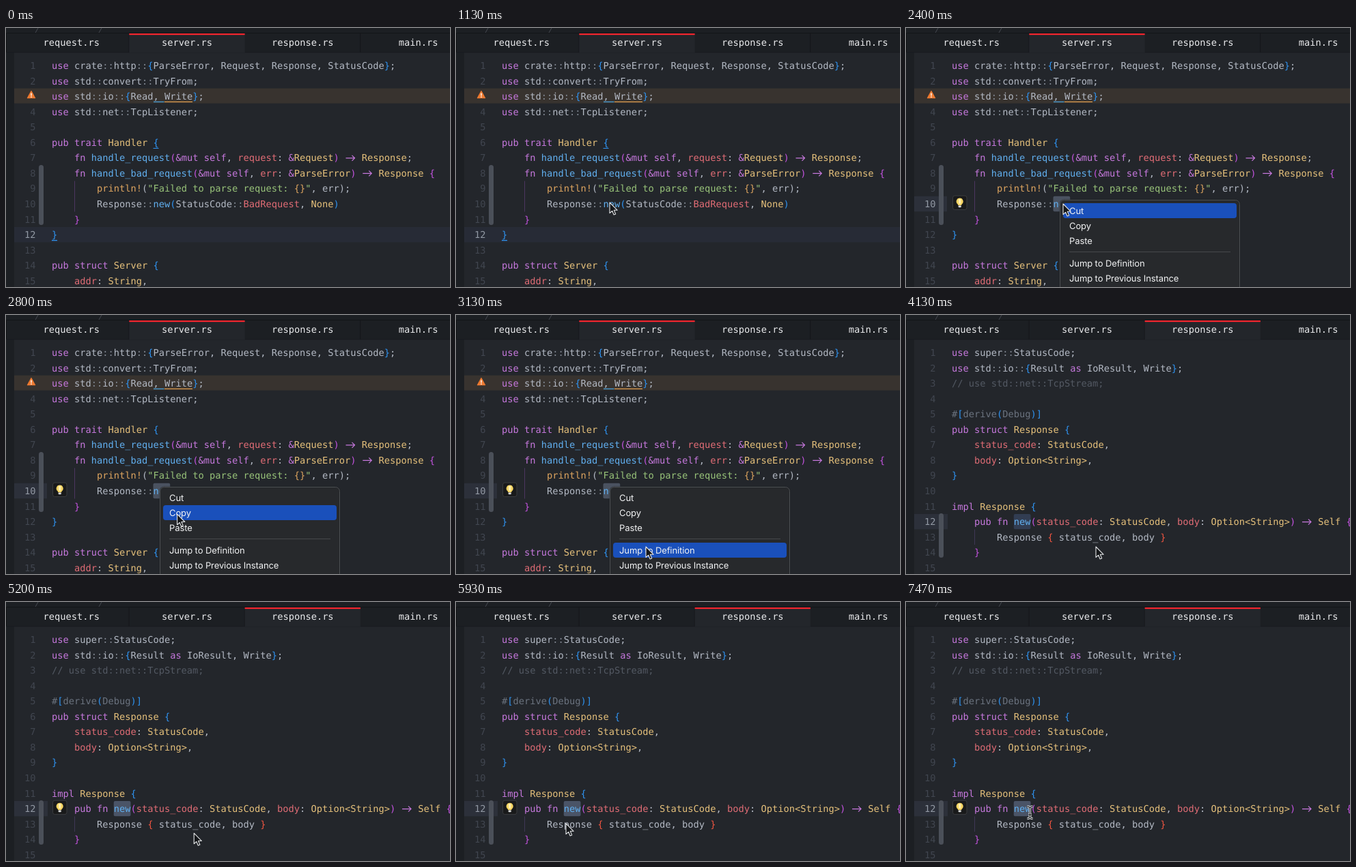
Animation of 650 by 380 pixels, one loop 7530 ms. Source, as an HTML page:

```html
<!DOCTYPE html>
<html lang="en">
<head>
<meta charset="utf-8">
<title>Jump to Definition</title>
<style>
html, body { margin: 0; width: 100%; height: 100%; overflow: hidden; background: #23262b; }
svg { display: block; width: 650px; height: 380px; text-rendering: geometricPrecision; }
text { white-space: pre; }
.code text { font: 13.7px "DejaVu Sans Mono", "Noto Sans Mono", monospace; }
.ui { font: 13px Inter, "Open Sans", sans-serif; letter-spacing: -.1px; fill: #f2f3f4; }
.tab { font: 500 11px Inter, "Open Sans", sans-serif; fill: #e9eaec; text-anchor: middle; }
</style>
</head>
<body>
<svg id="stage" viewBox="0 0 650 380"></svg>
<script>
const NS = 'http://www.w3.org/2000/svg';
const stage = document.getElementById('stage');
const CELL = 8.25, LEFT = 67, PITCH = 22.55;
const LOOP = 7530, RATE = 0.015; // 15 ticks per second

const COLORS = {
  t: '#b3b9c4', p: '#c678dd', y: '#e5c07b', r: '#e06c75', b: '#61afef', g: '#98c379',
  o: '#dda45f', d: '#828993', c: '#535963', a: '#2f94f2', m: '#c453e0', e: '#ef5541', n: '#6b737f'
};

// "~x" switches the colour of the text that follows
const SERVER = [
  '~puse ~tcrate~d::~thttp~d::~a{~tParseError, Request, Response, StatusCode~a}~t;',
  '~puse ~tstd~d::~tconvert~d::~tTryFrom;',
  '~puse ~tstd~d::~tio~d::~a{~tRead, Write~a}~t;',
  '~puse ~tstd~d::~tnet~d::~tTcpListener;',
  '',
  '~ppub trait ~yHandler ~a{',
  '    ~pfn ~bhandle_request~m(~p&mut self~t, ~rrequest~t: ~p&~yRequest~m) ~p-> ~yResponse~t;',
  '    ~pfn ~bhandle_bad_request~m(~p&mut self~t, ~rerr~t: ~p&~yParseError~m) ~p-> ~yResponse ~m{',
  '        ~oprintln!~t(~g"Failed to parse request: ~o{}~g"~t, err);',
  '        ~tResponse~d::~bnew~a(~tStatusCode~d::~rBadRequest~t, ~yNone~a)',
  '    ~m}',
  '~a}',
  '',
  '~ppub struct ~yServer ~a{',
  '    ~raddr~t: ~yString~t,'
];
const RESPONSE = [
  '~puse ~tsuper~d::~tStatusCode;',
  '~puse ~tstd~d::~tio~d::~a{~tResult ~pas ~tIoResult, Write~a}~t;',
  '~c// use std::net::TcpStream;',
  '',
  '~n#~a[~nderive~a(~nDebug~a)]',
  '~ppub struct ~yResponse ~a{',
  '    ~rstatus_code~t: ~yStatusCode~t,',
  '    ~rbody~t: ~yOption<String>~t,',
  '~a}',
  '',
  '~pimpl ~yResponse ~a{',
  '    ~ppub fn ~bnew~m(~rstatus_code~t: ~yStatusCode~t, ~rbody~t: ~yOption<String>~m) ~p-> ~ySelf ~m{',
  '        ~tResponse ~e{ ~tstatus_code, body ~e}',
  '    ~m}',
  ''
];
const MENU = [
  ['Cut', 268], ['Copy', 290], ['Paste', 312],
  ['Jump to Definition', 345], ['Jump to Previous Instance', 367]
];
// pointer track: tick, x, y
const TRACK = [
  [6, 2, 235], [8, 58, 247], [10, 122, 256], [13, 190, 259], [17, 225, 256],
  [34, 225, 256], [36, 230, 258], [38, 231, 258], [47, 278, 340], [69, 278, 340],
  [70, 277.5, 339.5], [77, 277.5, 339.5], [89, 161, 325], [90, 162, 321], [94, 170, 315],
  [99, 170, 315], [105, 181, 309], [110, 181, 309], [112, 181.5, 308.8]
];

function add(parent, tag, attrs = {}, text) {
  const el = document.createElementNS(NS, tag);
  for (const k in attrs) el.setAttribute(k, attrs[k]);
  if (text !== undefined) el.textContent = text;
  parent.appendChild(el);
  return el;
}
const group = (parent, cls = '') => add(parent, 'g', { class: cls });
const rect = (p, x, y, width, height, fill, rx = 0) => add(p, 'rect', { x, y, width, height, fill, rx });
const line = (p, d, stroke, w = 1) => add(p, 'path', { d, stroke, fill: 'none', 'stroke-width': w });
const mid = row => 55.1 + (row - 1) * PITCH;
const colX = col => LEFT + col * CELL;
const show = (el, on) => { el.style.display = on ? '' : 'none'; };

function drawLine(parent, src, row) {
  const y = mid(row) + 4.9;
  let col = 0, fill = COLORS.t;
  for (const part of src.split(/(~[a-z])/)) {
    if (/^~[a-z]$/.test(part)) { fill = COLORS[part[1]]; continue; }
    for (const word of part.split(/( +)/)) {
      const x = colX(col);
      if (word === '->') {
        line(parent, `M${x + 1.5} ${y - 4.5}H${x + 14.5}M${x + 10.5} ${y - 8.5}L${x + 14.5} ${y - 4.5}L${x + 10.5} ${y - .5}`, fill, 1.2);
      } else if (word.trim()) {
        add(parent, 'text', { x, y, fill }, word);
      }
      col += word.length;
    }
  }
}

function drawNumbers(parent) {
  return Array.from({ length: 15 }, (_, i) => add(parent, 'text', {
    x: 43.5, y: mid(i + 1) + 4.9, 'text-anchor': 'end'
  }, i + 1));
}

function drawTabs(parent, active) {
  ['request.rs', 'server.rs', 'response.rs', 'main.rs'].forEach((name, i) => {
    const x = 11 + i * 169.3;
    if (i === active) {
      rect(parent, x, 8, 169.3, 28, '#23262b');
      rect(parent, x, 8, 169.3, 2.2, '#f3262e');
    } else {
      rect(parent, x + 168.5, 8, 1, 28, '#15171a');
    }
    add(parent, 'text', { x: x + 84.7, y: 26, class: 'tab' }, name);
  });
}

function drawBulb(parent, row) {
  const g = add(parent, 'g', { transform: `translate(68 ${mid(row) - 12.5})` });
  add(g, 'rect', { x: .5, y: .5, width: 20.5, height: 20.5, rx: 3, fill: '#191a1b', stroke: '#3b3c3f' });
  add(g, 'path', { d: 'M10.7 4a5 5 0 0 0-3 9l.7 1.6h4.6l.7-1.6a5 5 0 0 0-3-9z', fill: '#f6d564' });
  add(g, 'path', { d: 'M8.9 5.8a3.6 3.6 0 0 1 3.6 0l-.4 6.4h-2.8z', fill: '#fff0b5' });
  rect(g, 8.6, 14.9, 4.2, 2.7, '#d9dadb', 1);
  return g;
}

// window frame
rect(stage, 0, 0, 650, 380, '#1c1f23');
rect(stage, 12, 36, 638, 344, '#23262b');
rect(stage, 0, 7, 650, 1, '#131518');
line(stage, 'M43 7L47 0M136 7L140 0', '#454950');
rect(stage, 0, 8, 1, 28, '#101214');
rect(stage, 0, 35.4, 650, .8, '#181a1e');

// server.rs
const server = group(stage, 'code');
drawTabs(server, 1);
rect(server, 12, 88.6, 638, 22, '#38332f');
const current = rect(server, 12, 292, 638, 22.4, '#272b36');
const gutter10 = rect(server, 12, mid(10) - 11.2, 48, 22.4, '#2c303a');
const picked = rect(server, colX(18), mid(10) - 11.2, CELL * 3, 22.4, '#4a5260', 2);
rect(server, 48, 201, 7, 88, '#4b5059', 3.5);
line(server, 'M100.5 224.5V269.5', '#4c3560');
const numsA = drawNumbers(server);
SERVER.forEach((src, i) => drawLine(server, src, i + 1));
show(numsA[2], false);
add(server, 'path', { d: 'M37 92.5L42.6 102.7H31.4Z', fill: '#ee7b32', stroke: '#ee7b32', 'stroke-width': 1.2, 'stroke-linejoin': 'round' });
line(server, 'M37 95.5V99.6M37 100.6V102', '#fff', 1.4);
line(server, 'M216 108.4H231.5', '#4b9fd6', 1.3);
line(server, 'M232 108.4H273', '#dc9b4e', 1.3);
const pair = line(server, `M${colX(18) } 176.5h8M67 311.6h8`, COLORS.a, 1.2);
const bulbA = drawBulb(server, 10);

// response.rs
const response = group(stage, 'code');
drawTabs(response, 2);
rect(response, 12, mid(12) - 11.2, 49, 22.4, '#2c303a');
const found = rect(response, colX(11), mid(12) - 11.2, CELL * 3, 22.4, '#323d52', 2);
rect(response, 48, 291, 7, 65, '#4b5059', 3.5);
line(response, 'M100.5 314.5V337', '#3f3656');
const numsB = drawNumbers(response);
RESPONSE.forEach((src, i) => drawLine(response, src, i + 1));
const bulbB = drawBulb(response, 12);

const paintNumbers = (nums, active) =>
  nums.forEach((n, i) => n.setAttribute('fill', i + 1 === active ? '#9299a4' : '#414650'));
paintNumbers(numsB, 12);

// context menu
const menu = group(stage);
add(menu, 'rect', { x: 224.5, y: 251.5, width: 265, height: 160, rx: 7, fill: '#17191c', opacity: .6 });
add(menu, 'rect', { x: 225.5, y: 252.5, width: 263, height: 160, rx: 6, fill: '#27292c', stroke: '#4d5053' });
const hover = rect(menu, 230, 257, 254, 22, '#1a50bb', 4);
line(menu, 'M239 328.5H475', '#46484b');
MENU.forEach(([label, y]) => add(menu, 'text', { x: 239, y: y + 4.6, class: 'ui' }, label));

// pointers
const arrow = add(stage, 'path', {
  d: 'M0 0V15.6L3.6 12.3L6.1 18L8.7 16.9L6.3 11.3H11.2Z',
  fill: '#15171a', stroke: '#e4e6e8', 'stroke-width': 1.1, 'stroke-linejoin': 'round'
});
const beam = group(stage);
const beamPath = 'M-4 -8.6Q-.3 -8.6 0 -6.2Q.3 -8.6 4 -8.6M0 -6.2V6.4M-4 8.8Q-.3 8.8 0 6.4Q.3 8.8 4 8.8M-2.4 3.4H2.4';
line(beam, beamPath, '#e4e6e8', 3.2);
line(beam, beamPath, '#1b1d20', 1.2);

function pointAt(k) {
  let i = 0;
  while (i < TRACK.length - 2 && TRACK[i + 1][0] <= k) i++;
  const [k0, x0, y0] = TRACK[i], [k1, x1, y1] = TRACK[i + 1];
  const u = Math.min(1, Math.max(0, (k - k0) / (k1 - k0)));
  const e = k < 17 ? u : u * u * (3 - 2 * u);
  return [x0 + (x1 - x0) * e, y0 + (y1 - y0) * e];
}

function render(time) {
  const k = Math.floor((time + 4) * RATE);
  const [x, y] = pointAt(k);

  show(server, k < 60);
  show(response, k >= 60);
  show(current, k < 27);
  show(pair, k < 27);
  show(gutter10, k >= 27);
  show(picked, k >= 28);
  show(bulbA, k >= 31);
  paintNumbers(numsA, k < 27 ? 12 : 10);

  show(found, k >= 61);
  found.setAttribute('fill', k < 66 ? '#323d52' : '#4a5467');
  show(bulbB, k >= 65);

  show(menu, k >= 35 && k < 60);
  menu.setAttribute('opacity', k < 58 ? 1 : k === 58 ? .65 : .3);
  const row = MENU.find(m => Math.abs(y - m[1]) <= 11);
  show(hover, row && k >= 36 && k !== 56);
  if (row) hover.setAttribute('y', row[1] - 11);

  const place = `translate(${x} ${y})`;
  arrow.setAttribute('transform', place);
  beam.setAttribute('transform', place);
  show(arrow, k >= 6 && k < 90);
  show(beam, k >= 90);
}

const start = performance.now();
function tick() {
  render((performance.now() - start) % LOOP);
  requestAnimationFrame(tick);
}
tick();
</script>
</body>
</html>
```
